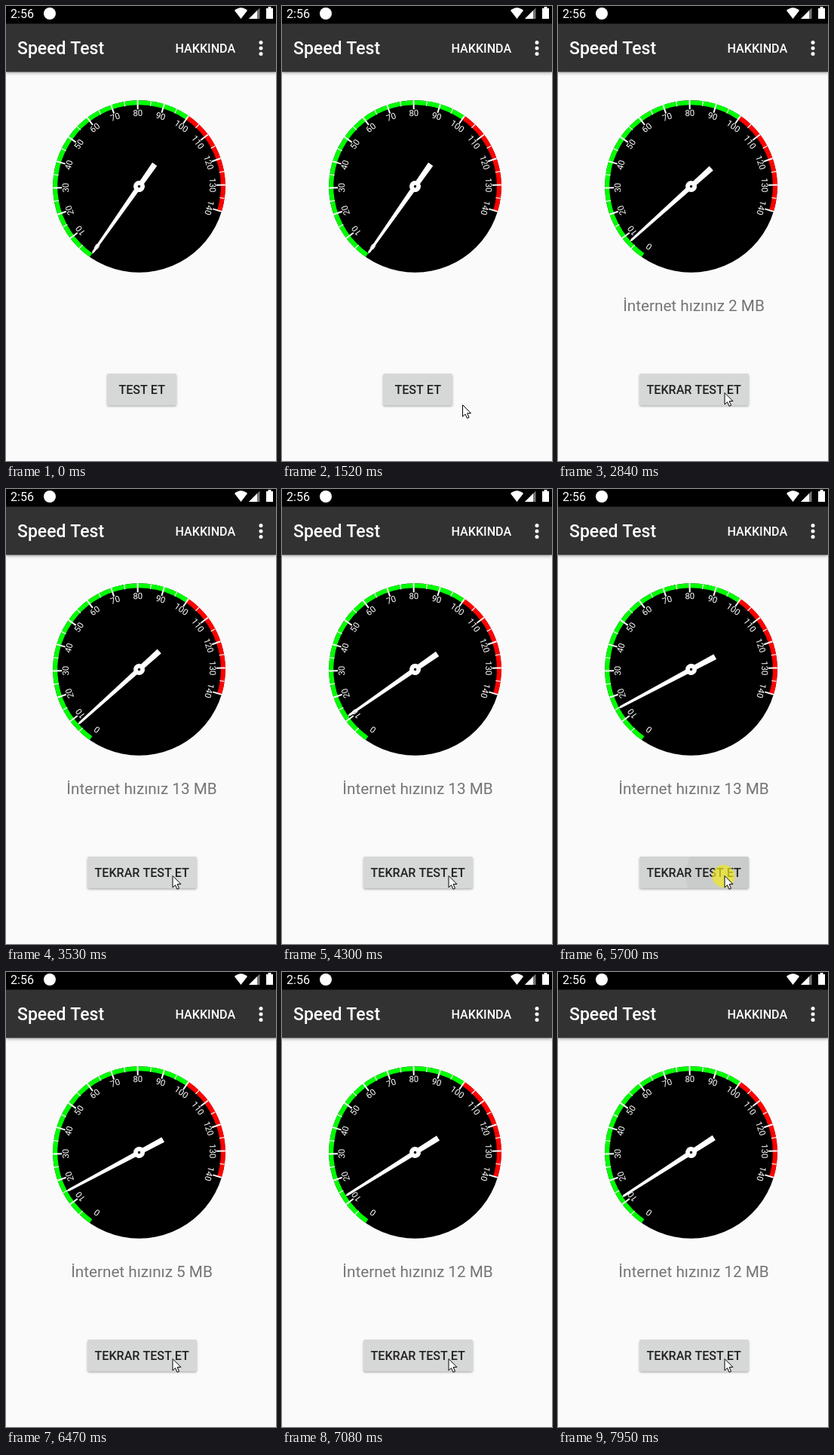
Recreate the animation shown at these times as an HTML page with a canvas. Size 358x604 px, loop 8000 ms.

```html
<!DOCTYPE html>
<html lang="tr">
<head>
<meta charset="utf-8">
<title>Speed Test</title>
<style>
  html, body { margin: 0; width: 100%; height: 100%; overflow: hidden; background: #fafafa; }
  canvas { display: block; width: 358px; height: 604px; }
</style>
</head>
<body>
<canvas id="stage" width="358" height="604"></canvas>
<script>
const ctx = document.getElementById('stage').getContext('2d');
const LOOP = 8000, TAU = Math.PI * 2;
const CX = 176.5, CY = 239.5, R = 114.3;
const rad = deg => deg * Math.PI / 180;
const angleOf = speed => rad(125 + 1.8 * speed);

const POINTER = [[810, 293, 598], [1516, 239, 529], [1594, 235, 523], [1752, 225, 516], [1829, 220.5, 513]];
const SPEED = [[2759, 0], [2760, 4], [2837, 7.2], [3530, 7.2], [4380, 11.6], [5240, 13.1], [5686, 14.95],
  [6160, 15.45], [6456, 14.9], [6930, 13.1], [7450, 11.9], [7800, 12.9], [7920, 12.3]];
const RESULTS = [[2760, 2], [3300, 13], [6160, 5], [6687, 12]];
const CLICKS = [2299, 5608];

function track(keys, t, col = 1) {
  if (t <= keys[0][0]) return keys[0][col];
  for (let i = 1; i < keys.length; i++) {
    const a = keys[i - 1], b = keys[i];
    if (t < b[0]) return a[col] + (b[col] - a[col]) * (t - a[0]) / (b[0] - a[0]);
  }
  return keys[keys.length - 1][col];
}

// The screen refreshes in coarse ticks.
function tick(t) {
  const [start, step] = t < 2760 ? [810, 78.4] : [2760, 77];
  return start + Math.floor((t - start) / step) * step;
}

function text(str, x, y, size, color, weight = 400, align = 'left') {
  ctx.font = `${weight} ${size}px Roboto, sans-serif`;
  ctx.textAlign = align;
  ctx.fillStyle = color;
  ctx.fillText(str, x, y);
}

function disc(x, y, r, color) {
  ctx.fillStyle = color;
  ctx.beginPath();
  ctx.arc(x, y, r, 0, TAU);
  ctx.fill();
}

function poly(points, color) {
  ctx.fillStyle = color;
  ctx.beginPath();
  points.forEach(([x, y]) => ctx.lineTo(x, y));
  ctx.closePath();
  ctx.fill();
}

function drawBars() {
  ctx.fillStyle = '#fafafa';
  ctx.fillRect(0, 0, 358, 604);
  ctx.save();
  ctx.shadowColor = 'rgba(0,0,0,.35)';
  ctx.shadowBlur = 4;
  ctx.shadowOffsetY = 1;
  ctx.fillStyle = '#323232';
  ctx.fillRect(0, 23, 358, 64.5);
  ctx.restore();
  ctx.fillStyle = '#000';
  ctx.fillRect(0, 0, 358, 23.5);

  text('2:56', 6, 16, 16.1, '#fff');
  disc(58, 10, 8, '#fff');

  // wifi, signal, battery
  ctx.fillStyle = '#fff';
  ctx.beginPath();
  ctx.moveTo(311.5, 17);
  ctx.lineTo(303, 6);
  ctx.quadraticCurveTo(311.5, -1.5, 320, 6);
  ctx.fill();
  poly([[322, 17], [336.5, 17], [336.5, 2.5]], '#777');
  poly([[322, 17], [333, 17], [333, 6]], '#fff');
  ctx.fillStyle = '#fff';
  ctx.fillRect(345, 3, 9, 14);
  ctx.fillRect(347.5, 1, 4, 3);

  text('Speed Test', 15, 64, 23, '#fff', 500);
  text('HAKKINDA', 224.5, 62, 16.1, '#fff', 500);
  [48.5, 56, 63.5].forEach(y => disc(338, y, 2.5, '#fff'));
}

function arc(from, to, color) {
  ctx.strokeStyle = color;
  ctx.lineWidth = 6;
  ctx.beginPath();
  ctx.arc(0, 0, R - 3, angleOf(from), angleOf(to));
  ctx.stroke();
}

function drawGauge(speed) {
  ctx.save();
  ctx.translate(CX, CY);
  disc(0, 0, R, '#000');
  arc(0, 100, '#0f0');
  arc(100, 140, '#f00');
  for (let v = 5; v <= 140; v += 5) {
    const major = v % 10 === 0;
    ctx.save();
    ctx.rotate(angleOf(v));
    ctx.fillStyle = '#fff';
    if (major) ctx.fillRect(R - 12, -1, 12, 2);
    else ctx.fillRect(R - 6.5, -0.6, 6.5, 1.2);
    ctx.restore();
  }
  for (let v = 0; v <= 140; v += 10) {
    ctx.save();
    ctx.rotate(angleOf(v) + Math.PI / 2);
    text(String(v), 0, -93.5, 11.5, '#fff', 400, 'center');
    ctx.restore();
  }
  ctx.rotate(angleOf(speed));
  poly([[-36, -3.8], [-36, 3.8], [106, 1.5], [109, 0], [106, -1.5]], '#fff');
  disc(0, 0, 7.5, '#fff');
  disc(0, 0, 1.7, '#000');
  ctx.restore();
}

function drawButton(t, px, py) {
  const again = t >= CLICKS[0] + 150;
  const [x, w] = again ? [108, 145] : [134, 92];
  const since = t - (t < CLICKS[1] ? CLICKS[0] : CLICKS[1]);
  ctx.save();
  ctx.beginPath();
  ctx.roundRect(x, 488, w, 42, 2);
  ctx.shadowColor = 'rgba(0,0,0,.3)';
  ctx.shadowBlur = 3;
  ctx.shadowOffsetY = 1.5;
  ctx.fillStyle = '#d6d7d7';
  ctx.fill();
  ctx.shadowColor = 'transparent';
  ctx.clip();
  if (since >= 0 && since < 460) {
    const fade = Math.min(1, (460 - since) / 240);
    ctx.fillStyle = `rgba(0,0,0,${0.02 * fade})`;
    ctx.fillRect(x, 488, w, 42);
    disc(px, py, since * 0.66, `rgba(0,0,0,${0.04 * fade})`);
  }
  ctx.restore();
  text(again ? 'TEKRAR TEST ET' : 'TEST ET', 180.2, 515, 16.1, '#212121', 500, 'center');
  if (since >= 0 && since < 150) disc(219.5, 514, 15, 'rgba(240,232,30,.7)');
}

function drawPointer(x, y) {
  ctx.save();
  ctx.translate(x, y);
  ctx.beginPath();
  [[0.5, 0.5], [0.5, 16], [4, 12.7], [6.5, 18.3], [9, 17.2], [6.6, 11.7], [11.4, 11.5]]
    .forEach(([a, b]) => ctx.lineTo(a, b));
  ctx.closePath();
  ctx.fillStyle = '#fff';
  ctx.fill();
  ctx.strokeStyle = '#000';
  ctx.lineWidth = 1;
  ctx.stroke();
  ctx.restore();
}

function draw(now) {
  const raw = now % LOOP, t = tick(raw);
  const px = track(POINTER, t), py = track(POINTER, t, 2);
  drawBars();
  drawGauge(track(SPEED, t));
  const result = RESULTS.filter(([at]) => t >= at).pop();
  if (result) text(`İnternet hızınız ${result[1]} MB`, 180, 405, 20.7, '#757575', 400, 'center');
  drawButton(t, px, py);
  if (raw >= 810) drawPointer(px, py);
}

const begin = performance.now();
function loop() {
  draw(performance.now() - begin);
  requestAnimationFrame(loop);
}
loop();
</script>
</body>
</html>
```
